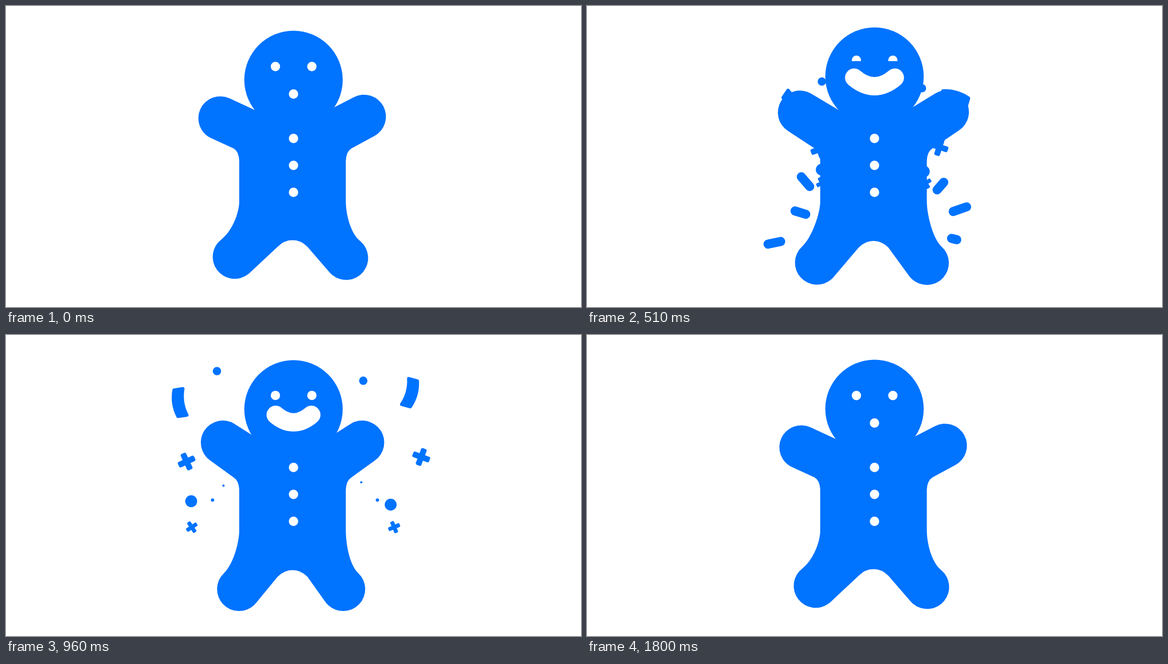
These frames come from a looping animation (1033x542 px, 1.83 s). An HTML page with a canvas:

```html
<!DOCTYPE html>
<html lang="en">
<head>
<meta charset="utf-8">
<title>Gingerbread jump</title>
<style>
  html, body { margin: 0; width: 100%; height: 100%; overflow: hidden; background: #fff; }
  canvas { display: block; }
</style>
</head>
<body>
<canvas id="stage" width="1033" height="542"></canvas>
<script>
const ctx = document.getElementById('stage').getContext('2d');
const BLUE = '#0073ff', WHITE = '#fff';
const LOOP = 1830, STEP = 30;
const AXIS = 514.75, FACE_X = 516.5;
const DEG = Math.PI / 180;

const lerp = (a, b, k) => a + (b - a) * k;
const clamp = (v, lo = 0, hi = 1) => Math.min(hi, Math.max(lo, v));
const smooth = k => k * k * (3 - 2 * k);

// Eased value through [time, value] keys.
function track(t, ...keys) {
  let i = 0;
  while (i < keys.length - 2 && t >= keys[i + 1][0]) i++;
  const [t0, a] = keys[i], [t1, b] = keys[i + 1];
  return lerp(a, b, smooth(clamp((t - t0) / (t1 - t0))));
}

const squashAt = t => track(t, [0, 0], [150, 1], [270, 1], [440, 0]);
const leapAt = t => track(t, [270, 0], [440, 1.2], [510, 1], [780, -0.4], [1070, 0]);
const swingAt = t => track(t, [270, 25], [440, 29], [780, 30], [1020, 30], [1200, 25.3], [1530, 21.5], [1800, 25]);
const leanAt = t => track(t, [0, 1], [780, 0], [1200, 0], [1530, -0.7], [1800, 1]);
const smileAt = t => track(t, [300, 0], [450, 1], [1640, 1], [1780, 0]);
const eyeAt = t => track(t, [270, -24], [510, -29.3], [780, -24], [1200, -26.5], [1530, -23.5], [1800, -24]);
const mouthAt = t => track(t, [270, 25.5], [480, 10], [510, 10], [780, 17.5], [1530, 14], [1640, 14], [1780, 25.5]);

// Eyelid opening, shut around two moments.
function lidAt(t) {
  const away = Math.min(Math.abs(t - 570), Math.abs(t - 1530));
  return lerp(3, 17, smooth(clamp((away - 20) / 80)));
}

function dot(x, y, r, color = BLUE) {
  ctx.fillStyle = color;
  ctx.beginPath();
  ctx.arc(x, y, Math.max(0, r), 0, Math.PI * 2);
  ctx.fill();
}

// Round limb end, at an angle below the horizontal from its joint.
function limbEnd(x, y, length, angle, r) {
  return { x: x - length * Math.cos(angle * DEG), y: y + length * Math.sin(angle * DEG), r };
}

// Angle where a line from x, y touches the circle.
function touch(c, x, y, sign) {
  const dx = x - c.x, dy = y - c.y;
  return Math.atan2(dy, dx) + sign * Math.acos(Math.min(1, c.r / Math.hypot(dx, dy)));
}

function halfBody(q, leap, swing, lean, side) {
  const reach = 93 + 7 * Math.max(0, leap), tilt = swing - lean * side;
  const shift = 1.75 * q * side, mid = AXIS + shift;
  const crotch = 421.5 + 14 * q + (swing - 25) * 0.35;
  const shoulder = lerp(198, 217, q);
  const pitX = lerp(409, 418, q), pitY = lerp(256.5, 293, q);
  const kneeX = lerp(488, 506.25, q) + shift, kneeY = lerp(crotch + 12, 445, q);

  const hand = limbEnd(470, 240 + 17 * q, lerp(reach, 25, q), lerp(-tilt, -7, q), 39.5);
  const hip = side > 0 ? 470 : lerp(475, 470, q);
  const legAngle = lerp(tilt + 26.5, 80, q);
  const foot = limbEnd(hip, 380, lerp(reach, 81, q), legAngle, lerp(39.5, 41.5, q));
  const outer = (180 - legAngle + lerp(103, 80, q)) * DEG;
  const ox = foot.x + foot.r * Math.cos(outer), oy = foot.y + foot.r * Math.sin(outer);

  ctx.beginPath();
  ctx.moveTo(mid + 1, shoulder);
  ctx.lineTo(470, shoulder);
  ctx.arc(hand.x, hand.y, hand.r, touch(hand, 470, shoulder, -1), touch(hand, pitX, pitY, 1), true);
  ctx.lineTo(pitX, pitY);
  ctx.quadraticCurveTo(lerp(418, 419, q), lerp(262, 296, q), 419, lerp(278, 300, q));
  ctx.lineTo(419, lerp(352, 370, q));
  ctx.bezierCurveTo(419, lerp(374, 400, q), ox - 23 * Math.sin(outer), oy + 23 * Math.cos(outer), ox, oy);
  ctx.arc(foot.x, foot.y, foot.r, outer, touch(foot, kneeX, kneeY, 1), true);
  ctx.lineTo(kneeX, kneeY);
  ctx.quadraticCurveTo(lerp(500, 510, q) + shift, crotch, mid, crotch);
  ctx.lineTo(mid + 1, crotch);
  ctx.closePath();
  ctx.fill();
}

function drawBody(t) {
  const pose = [squashAt(t), leapAt(t), swingAt(t), leanAt(t)];
  ctx.fillStyle = BLUE;
  halfBody(...pose, 1);
  ctx.save();
  ctx.translate(AXIS * 2, 0);
  ctx.scale(-1, 1);
  halfBody(...pose, -1);
  ctx.restore();
}

function drawButtons(t) {
  for (let i = 0; i < 3; i++) dot(FACE_X, 238.5 + i * 48.5 + 12.2 * squashAt(t), 8.4, WHITE);
}

function drawEye(x, y, cut) {
  dot(x, y, 8.4, WHITE);
  if (cut >= 16.8) return;
  const top = y - 8.4 + cut, edge = top + Math.max(0, 9.5 - cut) * 0.7;
  ctx.fillStyle = BLUE;
  ctx.beginPath();
  ctx.moveTo(x - 10, edge);
  ctx.quadraticCurveTo(x, 2 * top - edge, x + 10, edge);
  ctx.lineTo(x + 10, y + 10);
  ctx.lineTo(x - 10, y + 10);
  ctx.fill();
}

function drawHead(t) {
  const leap = leapAt(t), y = 133 + 24 * squashAt(t) - 6 * leap;
  dot(FACE_X, y, 88.4);
  for (const x of [484, 549.5]) drawEye(x, y + eyeAt(t), lidAt(t));

  const s = smileAt(t), my = y + mouthAt(t);
  const wide = s * (1 + 0.14 * Math.max(0, leap));
  if (s < 0.01) return dot(FACE_X, my, 8.4, WHITE);
  ctx.strokeStyle = WHITE;
  ctx.lineWidth = lerp(16.8, 33, s);
  ctx.lineCap = 'round';
  ctx.beginPath();
  ctx.moveTo(FACE_X - 32 * wide, my - 7 * wide);
  ctx.quadraticCurveTo(FACE_X, my + 20 * wide, FACE_X + 32 * wide, my - 7 * wide);
  ctx.stroke();
}

function ribbon() {
  ctx.beginPath();
  ctx.moveTo(4, -24);
  ctx.quadraticCurveTo(12, 0, 4, 24);
  ctx.lineTo(-12, 24);
  ctx.quadraticCurveTo(-4, 0, -12, -24);
  ctx.closePath();
  ctx.lineWidth = 6;
  ctx.lineJoin = 'round';
  ctx.fill();
  ctx.stroke();
}

const cross = r => () => {
  const w = r * 0.66;
  ctx.beginPath();
  ctx.roundRect(-r, -w / 2, r * 2, w, r * 0.18);
  ctx.roundRect(-w / 2, -r, w, r * 2, r * 0.18);
  ctx.fill();
};
const disc = r => () => dot(0, 0, r);

// Landing place from the burst centre, angle, spin, shape.
const BURST = { x: 515, y: 290 };
const confetti = [
  [-201, -164, 168, 44, ribbon], [209, -181, 9, 83, ribbon],
  [-184, -60, -18, -88, cross(16)], [223, -68, 14, 86, cross(16)],
  [-175, 54, -27, -90, cross(11)], [176, 54, -30, 90, cross(11)],
  [-133, -220, 0, 0, disc(7.5)], [124, -203, 0, 0, disc(7.5)],
  [-176, 9, 0, 0, disc(10.7)], [170, 15, 0, 0, disc(10.7)],
  [-139, 7, 0, 0, disc(3)], [147, 7, 0, 0, disc(3)],
  [-120, -18, 0, 0, disc(2)], [119, -24, 0, 0, disc(2)]
];
// Tail x, y; end x, y; how far the head leads the tail.
const dashes = [
  [400, 325, 370, 290, 0.5], [393, 375, 338, 358, 0.35], [348, 424, 310, 432, 0.6],
  [629, 331, 665, 289.5, 0.33], [658, 370, 698, 356, 0.6], [655, 418.5, 717, 433.5, 0.15]
];

function drawConfetti(t, k) {
  const size = 1 - clamp((t - 960) / 200) ** 2;
  for (const [x, y, angle, spin, shape] of confetti) {
    const far = Math.max(0, lerp(y < -100 ? 0.7 : 0.53, 1, k));
    ctx.save();
    ctx.translate(BURST.x + x * far, BURST.y + y * far);
    ctx.rotate((angle + spin * (k - 1)) * DEG);
    ctx.scale(size, size);
    shape();
    ctx.restore();
  }
}

function drawDashes(t, k) {
  const out = clamp(k), back = clamp(-k), fade = 1 - clamp((t - 790) / 130);
  if (fade <= 0 || back >= 1) return;
  ctx.lineCap = 'round';
  for (const [x, y, ex, ey, lead] of dashes) {
    const tail = 0.93 * out - 0.8 * back;
    const head = lerp(lead, 1, out) - (lead + 0.8) * back;
    const r = lerp(8.2, clamp(16 - 20 * lead, 4, 8), out);
    ctx.lineWidth = 2 * r * (1 - back) * fade;
    ctx.beginPath();
    ctx.moveTo(lerp(x, ex, tail), lerp(y, ey, tail));
    ctx.lineTo(lerp(x, ex, head), lerp(y, ey, head));
    ctx.stroke();
  }
}

function drawBurst(t) {
  if (t < 430 || t >= 1160) return;
  // 0 as pieces clear the body, 1 when nearly at rest.
  const k = (0.441 - Math.exp((420 - t) / 110)) / 0.403;
  ctx.fillStyle = ctx.strokeStyle = BLUE;
  drawConfetti(t, k);
  drawDashes(t, k);
}

function draw(t) {
  ctx.fillStyle = WHITE;
  ctx.fillRect(0, 0, 1033, 542);
  drawBurst(t);
  drawBody(t);
  drawHead(t);
  drawButtons(t);
}

const start = performance.now();
function tick() {
  const t = (performance.now() - start) % LOOP;
  draw(Math.floor(t / STEP) * STEP);
  requestAnimationFrame(tick);
}
tick();
</script>
</body>
</html>
```
